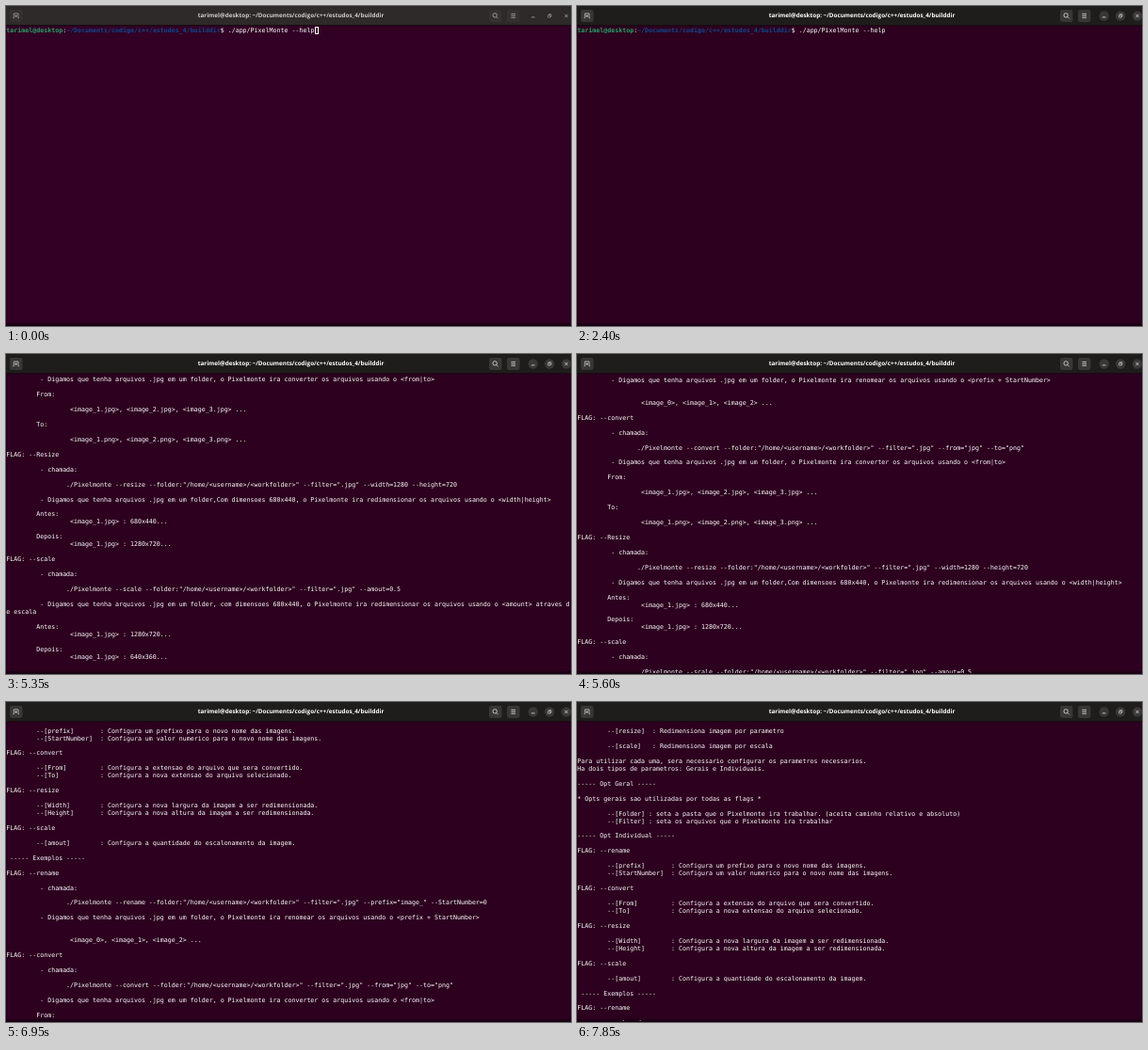
These frames come from a looping animation (600 by 340 pixels, 8 s). An HTML page:

```html
<!DOCTYPE html>
<html lang="pt">
<head>
<meta charset="utf-8">
<title>Terminal</title>
<style>
  html, body { margin: 0; width: 600px; height: 340px; overflow: hidden; background: #2c001e; }
  body { position: relative; }
  #strip { position: absolute; left: 0; top: 337px; width: 600px; height: 3px; background: #1c0014; }
  #screen { position: absolute; left: 0; top: 0; width: 600px; height: 339px; overflow: hidden; }
  pre {
    position: absolute; left: .3px; top: 22.9px; margin: 0; white-space: pre; color: #fff;
    font: 6.639px/7.96px "DejaVu Sans Mono", monospace;
    text-rendering: geometricPrecision; font-variant-ligatures: none;
  }
  .user { color: #26a269; font-weight: bold; }
  .path { color: #12488b; font-weight: bold; }
  #cursor { position: absolute; width: 4px; height: 8px; box-sizing: border-box; border: .6px solid #fff; }
  #bar { position: absolute; left: 0; top: 0; }
  #bar text { font: 700 6.33px "Open Sans", "Noto Sans", sans-serif; text-rendering: geometricPrecision; }
</style>
</head>
<body>
<div id="strip"></div>
<div id="screen">
  <pre id="prompt"><span class="user">tarimel@desktop</span>:<span class="path">~/Documents/codigo/c++/estudos_4/builddir</span>$ ./app/PixelMonte --help</pre>
  <pre id="help"></pre>
  <div id="cursor"></div>
</div>
<svg id="bar" width="600" height="21" viewBox="0 0 600 21">
  <rect width="600" height="20" fill="#1f1c1c"/>
  <rect id="backdrop" width="600" height="20" fill="#2d2a29"/>
  <rect y="20" width="600" height="1" fill="#160c11"/>
  <g id="buttons" fill="#393636">
    <rect x="4" y="4" width="13.5" height="13" rx="2"/>
    <rect x="513" y="4" width="13.5" height="13" rx="2"/>
    <rect x="532" y="4" width="13.5" height="13" rx="2"/>
  </g>
  <g id="rounds" fill="#3a3737">
    <circle cx="559.7" cy="10.5" r="5.2"/>
    <circle cx="577.2" cy="10.5" r="5.2"/>
    <circle cx="595" cy="10.5" r="5.2"/>
  </g>
  <g id="icons" fill="none" stroke="#fff" stroke-width=".7">
    <path d="M7.4 12.9H8.3V8H13V12.9H13.9M10.65 9.3V12.1M9.25 10.7H12.05" stroke-width=".6"/>
    <circle cx="519.2" cy="9.9" r="2.2"/>
    <path d="M520.8 11.5L522.6 13.3"/>
    <path d="M536.4 8.4H541M536.4 10.4H541M536.4 12.4H541"/>
    <path d="M557.9 11.9H561.5"/>
    <path d="M575.6 9.7H578V12.1H575.6ZM576.5 9.7V8.7H579V11.2H578" stroke-width=".5"/>
    <path d="M593.3 8.8L596.7 12.2M596.7 8.8L593.3 12.2"/>
  </g>
  <text id="title" x="302.5" y="12" text-anchor="middle" fill="#fff">tarimel@desktop: ~/Documents/codigo/c++/estudos_4/builddir</text>
</svg>
<script>
const HELP = `        --[resize]  : Redimensiona imagem por parametro

        --[scale]   : Redimensiona imagem por escala

Para utilizar cada uma, sera necessario configurar os parametros necessarios.
Ha dois tipos de parametros: Gerais e Individuais.

----- Opt Geral -----

* Opts gerais sao utilizadas por todas as flags *

        --[Folder] : seta a pasta que o Pixelmonte ira trabalhar. (aceita caminho relativo e absoluto)
        --[Filter] : seta os arquivos que o Pixelmonte ira trabalhar

----- Opt Individual -----

FLAG: --rename

        --[prefix]       : Configura um prefixo para o novo nome das imagens.
        --[StartNumber]  : Configura um valor numerico para o novo nome das imagens.

FLAG: --convert

        --[From]         : Configura a extensao do arquivo que sera convertido.
        --[To]           : Configura a nova extensao do arquivo selecionado.

FLAG: --resize

        --[Width]        : Configura a nova largura da imagem a ser redimensionada.
        --[Height]       : Configura a nova altura da imagem a ser redimensionada.

FLAG: --scale

        --[amout]        : Configura a quantidade do escalonamento da imagem.

 ----- Exemplos -----

FLAG: --rename

         - chamada:

                ./Pixelmonte --rename --folder:"/home/<username>/<workfolder>" --filter=".jpg" --prefix="image_" --StartNumber=0

         - Digamos que tenha arquivos .jpg em um folder, o Pixelmonte ira renomear os arquivos usando o <prefix + StartNumber>


                 <image_0>, <image_1>, <image_2> ...

FLAG: --convert

         - chamada:

                ./Pixelmonte --convert --folder:"/home/<username>/<workfolder>" --filter=".jpg" --from="jpg" --to="png"

         - Digamos que tenha arquivos .jpg em um folder, o Pixelmonte ira converter os arquivos usando o <from|to>

        From:

                 <image_1.jpg>, <image_2.jpg>, <image_3.jpg> ...

        To:

                 <image_1.png>, <image_2.png>, <image_3.png> ...

FLAG: --Resize

         - chamada:

                ./Pixelmonte --resize --folder:"/home/<username>/<workfolder>" --filter=".jpg" --width=1280 --height=720

         - Digamos que tenha arquivos .jpg em um folder,Com dimensoes 680x440, o Pixelmonte ira redimensionar os arquivos usando o <width|height>

        Antes:
                 <image_1.jpg> : 680x440...

        Depois:
                 <image_1.jpg> : 1280x720...

FLAG: --scale

         - chamada:

                ./Pixelmonte --scale --folder:"/home/<username>/<workfolder>" --filter=".jpg" --amout=0.5

         - Digamos que tenha arquivos .jpg em um folder, com dimensoes 680x440, o Pixelmonte ira redimensionar os arquivos usando o <amount> atraves d
e escala

        Antes:
                 <image_1.jpg> : 1280x720...

        Depois:
                 <image_1.jpg> : 640x360...


Enter para continuar: `;

const LOOP = 8000, STEP = 50;
const COL = 3.997, ROW = 7.96, LEFT = 0.3, TOP = 21.7, TEXT_DROP = 1.2;
const FOCUS = 1800, OUTPUT = 3750, BLINK = 600;
const LAST_LINE = 94;

// [ms, first visible line]
const SCROLL = [
  [5300, 56], [5600, 42.71], [5850, 34], [6100, 29.44], [6200, 29.44],
  [6550, 22.7], [6650, 22.7], [6950, 17.4], [7500, 5.2], [7550, 5.2], [7850, -0.66]
];

const $ = id => document.getElementById(id);
const clamp = v => Math.min(1, Math.max(0, v));
const mix = (a, b, k) => a + (b - a) * k;

$("help").textContent = HELP;

function scrollAt(t) {
  if (t <= SCROLL[0][0]) return SCROLL[0][1];
  for (let i = 1; i < SCROLL.length; i++) {
    const [t0, a] = SCROLL[i - 1], [t1, b] = SCROLL[i];
    if (t <= t1) return mix(a, b, (t - t0) / (t1 - t0));
  }
  return SCROLL[SCROLL.length - 1][1];
}

function drawBar(focus) {
  $("backdrop").style.opacity = 1 - focus;
  $("buttons").style.opacity = mix(0.6, 1, focus);
  $("rounds").style.opacity = focus;
  $("icons").style.opacity = mix(0.68, 0.95, focus);
  $("title").style.opacity = mix(0.76, 1, focus);
  const [r, g, b] = [[49, 44], [0, 0], [36, 30]].map(([p, q]) => Math.round(mix(p, q, focus)));
  document.body.style.background = `rgb(${r},${g},${b})`;
}

function drawCursor(t, col, row) {
  const focused = t >= FOCUS;
  const start = t >= OUTPUT ? OUTPUT : FOCUS;
  const on = !focused || Math.floor((t - start) / BLINK) % 2 === 0;
  const s = $("cursor").style;
  s.visibility = on ? "visible" : "hidden";
  s.background = focused ? "#fff" : "none";
  s.left = LEFT + col * COL + "px";
  s.top = TOP + row * ROW + "px";
}

function draw(time) {
  const t = Math.floor((time % LOOP) / STEP) * STEP;
  const done = t >= OUTPUT;
  const first = scrollAt(t);
  drawBar(clamp((t - FOCUS + STEP) / 350));
  $("prompt").style.visibility = done ? "hidden" : "visible";
  $("help").style.visibility = done ? "visible" : "hidden";
  $("help").style.top = TOP + TEXT_DROP - first * ROW + "px";
  if (done) drawCursor(t, 22, LAST_LINE - first);
  else drawCursor(t, 82, 0);
}

const begin = performance.now();
function tick() {
  draw(performance.now() - begin);
  requestAnimationFrame(tick);
}
tick();
</script>
</body>
</html>
```
